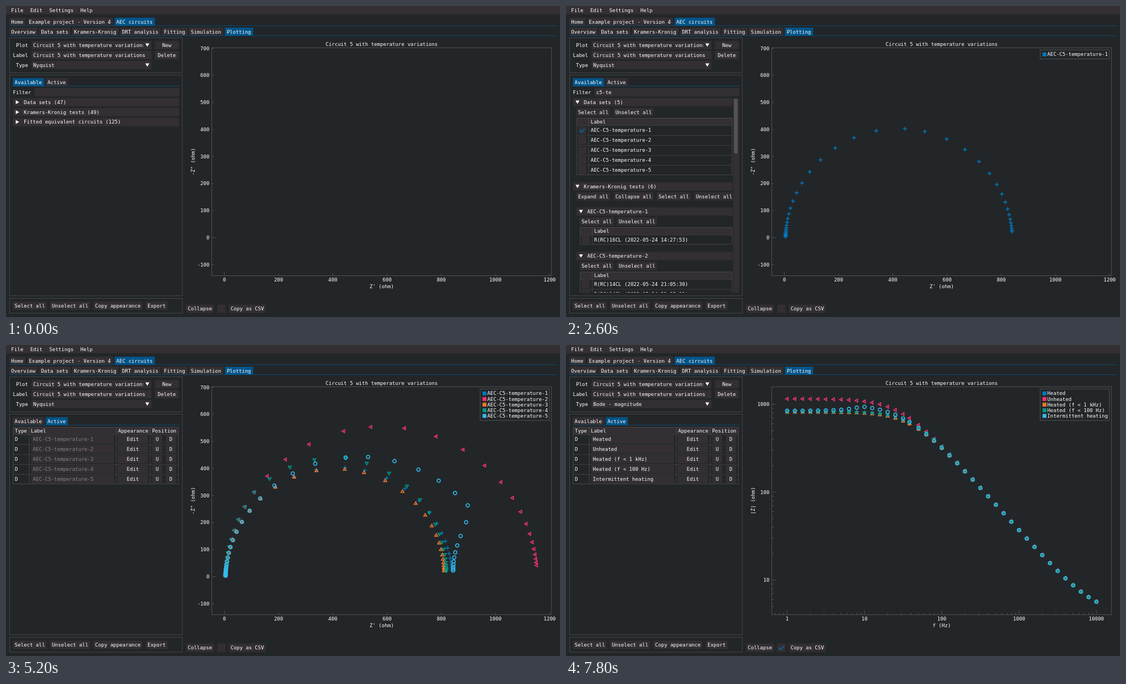
Write an HTML page with a canvas that moves like this. It is 998 by 561 pixels and loops after 8 s.

```html
<!DOCTYPE html>
<html lang="en">
<head>
<meta charset="utf-8">
<title>Plotting tab</title>
<style>
html, body { margin: 0; width: 100%; height: 100%; overflow: hidden; background: #232628; }
canvas { display: block; }
</style>
</head>
<body>
<canvas id="stage" width="998" height="561"></canvas>
<script>
// The interface is laid out on a 1280 x 720 grid and scaled to the stage.
const W = 998, H = 561, SCALE = W / 1280, CHAR = 7, ROW = 19;
const BG = '#232628', FRAME = '#332f33', ACCENT = '#005489', BORDER = '#4e5052',
  AXIS = '#5c5f60', CHECK = '#0b62a0', MUTED = '#858585', WHITE = '#fff';
const COLORS = ['#0077bb', '#ee3377', '#ee7733', '#009988', '#33bbee'];
const SETS = [1, 2, 3, 4, 5].map(n => 'AEC-C5-temperature-' + n);
const NAMES = ['Heated', 'Unheated', 'Heated (f < 1 kHz)', 'Heated (f < 100 Hz)', 'Intermittent heating'];
const TITLE = 'Circuit 5 with temperature variations';
const PLOT = { left: 475.5, right: 1260.5, top: 96.5, bottom: 624 };
const MID_X = (PLOT.left + PLOT.right) / 2, MID_Y = (PLOT.top + PLOT.bottom) / 2;

let c;

function rect(x, y, w, h, color = FRAME) {
  c.fillStyle = color;
  c.fillRect(x, y, w, h);
}

function outline(x, y, right, bottom, color = BORDER) {
  c.strokeStyle = color;
  c.lineWidth = 1;
  c.strokeRect(x, y, right - x, bottom - y);
}

function path(points, color, width, closed) {
  c.beginPath();
  points.forEach(([x, y]) => c.lineTo(x, y));
  if (closed) c.closePath();
  c.strokeStyle = color;
  c.lineWidth = width;
  c.stroke();
}

const line = (x1, y1, x2, y2, color = BORDER) => path([[x1, y1], [x2, y2]], color, 1);

function text(s, x, cy, align = 'left', color = WHITE) {
  c.font = '11.63px "DejaVu Sans Mono", monospace';
  c.textAlign = align;
  c.fillStyle = color;
  c.fillText(s, x, cy + 4);
}

function clipped(x, y, w, h, draw) {
  c.save();
  c.beginPath();
  c.rect(x, y, w, h);
  c.clip();
  draw();
  c.restore();
}

function field(s, x, right, cy, align = 'left', color) {
  rect(x, cy - 9.5, right - x, ROW);
  text(s, align === 'center' ? (x + right) / 2 : x + 4, cy, align, color);
}

function buttons(labels, x, cy) {
  for (const s of labels) {
    const w = s.length * CHAR + 8;
    field(s, x, x + w, cy);
    x += w + 8;
  }
}

function tabs(labels, active, x, y, right) {
  rect(x, y + 18, right - x, 1, ACCENT);
  labels.forEach((s, i) => {
    const w = s.length * CHAR + 9;
    rect(x, y, w, i === active ? ROW : 18, i === active ? ACCENT : FRAME);
    text(s, x + 4, y + 9.5);
    x += w + 4;
  });
}

function arrow(x, y, down) {
  const r = 5.2, a = .866 * r, b = .75 * r;
  c.beginPath();
  for (const [u, v] of [[0, b], [-a, -b], [a, -b]]) down ? c.lineTo(x + u, y + v) : c.lineTo(x + v, y + u);
  c.fillStyle = WHITE;
  c.fill();
}

function combo(s, x, right, cy) {
  rect(x, cy - 9.5, right - x, ROW);
  clipped(x, cy - 10, right - x - ROW, 20, () => text(s, x + 4, cy));
  arrow(right - 9.5, cy, true);
}

function header(s, x, right, cy, open) {
  rect(x, cy - 9.5, right - x, ROW);
  arrow(x + 10.5, cy, open);
  text(s, x + 25, cy);
}

function checkbox(x, y, checked) {
  rect(x, y, ROW, ROW);
  if (checked) {
    const bx = x + 7.5, by = y + 13.4, t = 3.9;
    path([[bx - t, by - t], [bx, by], [bx + 2 * t, by - 2 * t]], CHECK, 2.6);
  }
}

function grid(x, right, y, splits, rows) {
  const bottom = y + 17 + rows * 23;
  rect(x, y, right - x, 17);
  outline(x + .5, y + .5, right - .5, bottom - .5);
  for (let i = 0; i < rows; i++) line(x, y + 17.5 + 23 * i, right, y + 17.5 + 23 * i, '#434547');
  for (const s of splits) line(s + .5, y, s + .5, bottom);
}

function checkList(labels, x, y, checked) {
  grid(x, 384, y, [x + 28], labels.length);
  text('Label', x + 33, y + 8.5);
  labels.forEach((s, i) => {
    checkbox(x + 4, y + 19 + 23 * i, i < checked);
    text(s, x + 33, y + 28.5 + 23 * i);
  });
}

function availableTab(filtered, checked) {
  text('Filter', 16, 199.5);
  field(filtered ? 'c5-te' : '', 66, 400, 199.5);
  if (!filtered) {
    ['Data sets (47)', 'Kramers-Kronig tests (49)', 'Fitted equivalent circuits (125)']
      .forEach((s, i) => header(s, 16, 400, 222.5 + 23 * i, false));
    return;
  }
  rect(386, 213, 14, 450);
  rect(388, 215, 8.5, 126, '#545456');
  clipped(16, 213, 369, 450, () => {
    header('Data sets (5)', 16, 385, 222.5, true);
    buttons(['Select all', 'Unselect all'], 24, 245.5);
    checkList(SETS, 24, 259, checked);
    header('Kramers-Kronig tests (6)', 16, 385, 417.5, true);
    buttons(['Expand all', 'Collapse all', 'Select all', 'Unselect all'], 24, 440.5);
    const tests = [
      ['R(RC)16CL (2022-05-24 14:27:53)'],
      ['R(RC)14CL (2022-05-24 21:05:30)', 'R(RC)14CL (2022-05-24 21:05:11)']
    ];
    tests.forEach((list, i) => {
      const y = 475.5 + 103 * i;
      header(SETS[i], 24, 385, y, true);
      buttons(['Select all', 'Unselect all'], 32, y + 23);
      checkList(list, 32, y + 36.5, 0);
    });
  });
}

function activeTab(named) {
  grid(16, 399, 190, [53, 254, 333], 5);
  text('Type', 20.5, 198.5);
  text('Label', 57.5, 198.5);
  text('Appearance', 259, 198.5);
  text('Position', 337.5, 198.5);
  SETS.forEach((s, i) => {
    const y = 218.5 + 23 * i;
    text('D', 20.5, y);
    field(named ? NAMES[i] : s, 58, 250, y, 'left', named ? WHITE : MUTED);
    field('Edit', 258, 328, y, 'center');
    field('U', 338, 361, y, 'center');
    field('D', 369, 393, y, 'center');
  });
}

// Resistance of each set at the i-th frequency (ten per decade from 1 Hz).
const RESISTANCE = [
  () => 837,
  () => 1151,
  i => 808 + .065 * i * i,
  i => Math.min(1151, 816 + 7.8 * 1.365 ** (i - 8)),
  i => i > 10 ? Math.max(838, 982 - 9 * (i - 10) - .4 * (i - 10) ** 2)
              : Math.min(982, 841 + 100 * 1.72 ** (i - 9))
];

// Depressed semicircle: a resistor in series with a resistor and a nearly ideal capacitor.
function impedance(set, i) {
  const f = 10 ** (i / 10) * (i === 16 ? .96 : 1), r = RESISTANCE[set](i), a = .977;
  const u = (f * r / 33850) ** a, angle = a * Math.PI / 2;
  const re = 1 + u * Math.cos(angle), im = u * Math.sin(angle), d = re * re + im * im;
  return { f, re: 4 + r * re / d, im: r * im / d };
}

function marker(set, x, y) {
  const color = COLORS[set], r = 4;
  if (set === 0) {
    path([[x - r - .5, y], [x + r + .5, y]], color, 2);
    path([[x, y - r - .5], [x, y + r + .5]], color, 2);
    return;
  }
  const sides = set === 4 ? 10 : 3, start = [0, Math.PI, -Math.PI / 2, Math.PI / 2, 0][set];
  const points = Array.from({ length: sides }, (_, k) => {
    const angle = start + k * 2 * Math.PI / sides;
    return [x + r * Math.cos(angle), y + r * Math.sin(angle)];
  });
  path(points, color, 2, true);
}

function tickX(x, label, major) {
  line(x, PLOT.bottom, x, PLOT.bottom - (major ? 10 : 5), AXIS);
  text(label, x, 634, 'center');
}

function tickY(y, label, major) {
  line(PLOT.left, y, PLOT.left + (major ? 10 : 5), y, AXIS);
  text(label, 470, y, 'right');
}

function axes(bode, x, y) {
  if (bode) {
    for (let p = -1; p < 5; p++) for (let m = 1; m < 10; m++) {
      const v = m * 10 ** p, label = m === 1 ? String(v) : '';
      if (v > .65 && v < 15000) tickX(x(v), label, m === 1);
      if (v > 4.5 && v < 1500) tickY(y(v), label, m === 1);
    }
  } else {
    for (let v = 0; v <= 1200; v += 200) tickX(x(v), String(v), v === 0);
    for (let v = -100; v <= 700; v += 100) tickY(y(v), String(v), v === 0);
  }
  outline(PLOT.left, PLOT.top, PLOT.right, PLOT.bottom, AXIS);
  text(TITLE, MID_X, 88.5, 'center');
  text(bode ? 'f (Hz)' : "Z' (ohm)", MID_X, 648.5, 'center');
  c.save();
  c.translate(431.5, MID_Y);
  c.rotate(-Math.PI / 2);
  text(bode ? '|Z| (ohm)' : '-Z" (ohm)', 0, 0, 'center');
  c.restore();
}

function legend(labels) {
  if (!labels.length) return;
  const bottom = 109.5 + 13 * labels.length;
  rect(1095, 101, 161, bottom - 101, BG);
  outline(1095.5, 101.5, 1255.5, bottom, AXIS);
  labels.forEach((s, i) => {
    rect(1101, 107.5 + 13 * i, 9, 9, COLORS[i]);
    text(s, 1112, 112 + 13 * i);
  });
}

function plot(count, labels, bode) {
  const x = bode ? v => 511 + 178.6 * Math.log10(v) : v => 504.6 + .6263 * v;
  const y = bode ? v => 747 - 203.3 * Math.log10(v) : v => 536 - .6256 * v;
  axes(bode, x, y);
  for (let set = 0; set < count; set++) for (let i = 0; i <= 40; i++) {
    const z = impedance(set, i);
    marker(set, x(bode ? z.f : z.re), y(bode ? Math.hypot(z.re, z.im) : z.im));
  }
  legend(labels.slice(0, count));
}

function paint({ filtered, count = 0, active, named, bode }) {
  const canvas = document.createElement('canvas');
  canvas.width = W;
  canvas.height = H;
  c = canvas.getContext('2d');
  c.scale(SCALE, SCALE);
  rect(0, 0, 1280, 720, BG);

  rect(0, 0, 1280, ROW);
  [['File', 12], ['Edit', 56], ['Settings', 100], ['Help', 172]].forEach(([s, x]) => text(s, x, 9.5));
  tabs(['Home', 'Example project - Version 4', 'AEC circuits'], 2, 8, 27, 1272);
  tabs(['Overview', 'Data sets', 'Kramers-Kronig', 'DRT analysis', 'Fitting', 'Simulation', 'Plotting'], 6, 8, 50, 1272);

  outline(8.5, 73.5, 407.5, 154.5);
  outline(8.5, 159.5, 407.5, 670.5);
  outline(8.5, 676.5, 407.5, 710.5);
  ['Plot', 'Label', 'Type'].forEach((s, i) => text(s, 51, 90.5 + 23 * i, 'right'));
  combo(TITLE, 59, 336, 90.5);
  field(TITLE, 59, 336, 113.5);
  combo(bode ? 'Bode - magnitude' : 'Nyquist', 59, 336, 136.5);
  field('New', 344, 399, 90.5, 'center');
  field('Delete', 344, 399, 113.5, 'center');

  tabs(['Available', 'Active'], active ? 1 : 0, 16, 167, 400);
  if (active) activeTab(named);
  else availableTab(filtered, count);

  buttons(['Select all', 'Unselect all', 'Copy appearance', 'Export'], 16, 693.5);
  buttons(['Collapse'], 416, 700.5);
  checkbox(488, 691, bode);
  buttons(['Copy as CSV'], 515, 700.5);
  plot(count, named ? NAMES : SETS, bode);
  return canvas;
}

const scenes = [
  {},
  { filtered: true },
  { filtered: true, count: 1 },
  { filtered: true, count: 5 },
  { active: true, count: 5 },
  { active: true, count: 5, named: true },
  { active: true, count: 5, named: true, bode: true }
].map(paint);

const LOOP = 8000, HOLD = 1000, STEP = 100, STEPS = 4, PERIOD = HOLD + STEP * (STEPS - 1);
const view = document.getElementById('stage').getContext('2d');
const begin = performance.now();

// Each scene holds, then blends into the next in even steps.
function render() {
  const t = (performance.now() - begin) % LOOP;
  const i = Math.floor(t / PERIOD), rest = t % PERIOD;
  view.globalAlpha = 1;
  view.drawImage(scenes[i], 0, 0);
  if (rest >= HOLD && scenes[i + 1]) {
    view.globalAlpha = (Math.floor((rest - HOLD) / STEP) + 1) / STEPS;
    view.drawImage(scenes[i + 1], 0, 0);
  }
  requestAnimationFrame(render);
}
render();
</script>
</body>
</html>
```
